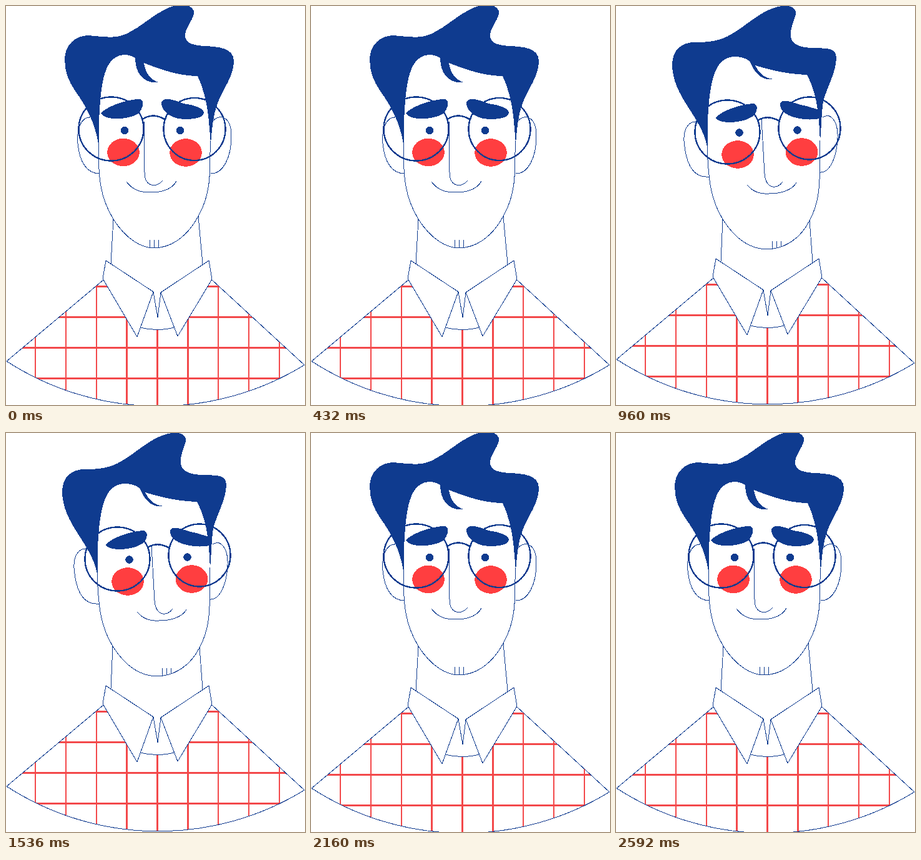
Write an HTML page that moves like this. It is 479 by 638 pixels and loops after 2.88 s.

```html
<!DOCTYPE html>
<html lang="en">
<head>
<meta charset="utf-8">
<title>Man with glasses</title>
<style>
  html, body { margin: 0; width: 100%; height: 100%; overflow: hidden; background: #fff; }
  svg { display: block; width: 100%; height: 100%; shape-rendering: crispEdges; }
  .line { fill: none; stroke: #0f3b8f; stroke-width: 1; }
  .paper { fill: #fff; stroke: #0f3b8f; stroke-width: 1; }
  .frame { fill: none; stroke: #0f3b8f; stroke-width: 2.4; }
  .ink { fill: #0f3b8f; }
  .cheek { fill: #ff3e40; }
  .check { fill: none; stroke: #f3484a; stroke-width: 2.4; }
</style>
</head>
<body>
<svg id="stage" viewBox="0 0 479 638">
  <defs>
    <clipPath id="shirtClip"><path d="M156 438L1 568A448 448 0 0 0 478 574L330 438Z"/></clipPath>
    <g id="shirt">
      <path class="check" clip-path="url(#shirtClip)" id="checks"/>
      <path class="line" d="M156 438L1 568A448 448 0 0 0 478 574L330 438"/>
    </g>
    <path id="collar" class="paper" d="M160 407L236 457L210 529L155 436ZM325 407L248 458L275 528L330 437ZM236 457L243 498L248 458"/>
  </defs>
</svg>
<script>
const stage = document.getElementById('stage');

let checks = '';
for (let i = 0; i < 9; i++) checks += `M${47.1 + i * 48.85} 430V640`;
for (let i = 0; i < 4; i++) checks += `M0 ${448.3 + i * 49}H479`;
document.getElementById('checks').setAttribute('d', checks);

const path = (kind, d) => `<path class="${kind}" d="${d}"/>`;
const ellipse = (kind, [x, y], rx, ry) =>
  `<ellipse class="${kind}" cx="${x}" cy="${y}" rx="${rx}" ry="${ry}"/>`;
const openEye = point => ellipse('ink', point, 6.3, 6.3);
const halfEye = ([x, y]) => path('ink', `M${x - 8} ${y}C${x - 5} ${y - 8} ${x + 5} ${y - 8} ${x + 8} ${y}Q${x} ${y + 3} ${x - 8} ${y}Z`);

// Paired points are listed left, then right.
const poses = {
  left: {
    dy: 0, eye: openEye,
    neck: ['172 341', '308 336'],
    jaw: 'M148 165V220C148 275 150 304 172 341C194 375 218 387 238 387C268 386 293 365 308 336C329 300 327 265 327 215',
    ears: 'M137 178C121 176 113 195 115 220C118 252 131 268 150 268M331 184C346 170 361 180 361 208C361 242 348 269 327 268',
    hair: 'M148 220C142 186 129 161 111 136C100 120 94 105 94 85C94 62 112 47 132 47C152 48 172 54 194 44C222 31 245 3 277 -2C290 -4 303 3 301 13C298 25 285 38 287 49C289 61 303 63 318 64C340 65 365 67 365 88C365 112 348 132 339 155C332 174 330 195 328 220C325 190 325 150 307 112C280 112 250 103 221 91C223 107 232 119 245 122C225 125 207 112 207 83C200 79 195 78 188 78C155 82 150 125 148 220Z',
    brows: 'M152 171C164 159 196 149 214 149C223 150 220 166 210 173C195 182 158 184 152 171ZM249 153C254 145 269 150 284 156C300 158 317 163 317 171C316 179 300 181 285 181C263 180 248 168 249 153Z',
    eyes: [[190, 199], [279, 199]],
    cheeks: [[188, 234], [288, 234.5]],
    lenses: [[168.5, 196.5], [302, 197]],
    bridge: 'M219 181Q235 170 254 181',
    nose: 'M221 183L222 266C222 290 242 291 251 279',
    mouth: 'M193 281C203 294 214 298 232 298C255 298 268 290 273 280',
    chin: 'M230 386L231 374M237 387V374M244 386L245 374'
  },
  middle: {
    dy: -2, eye: halfEye,
    neck: ['172 338', '310 335'],
    jaw: 'M147 165V220C148 262 154 303 172 338C192 370 216 385 240 385C270 384 295 365 310 335C325 302 324 262 327 215',
    ears: 'M130 179C116 179 111 196 112 214C115 248 128 266 150 268M330 176C346 169 358 184 357 208C355 242 343 265 327 264',
    hair: 'M147 220C138 172 95 141 95 90C95 66 112 50 134 51C155 52 172 51 190 40C215 24 240 3 271 0C283 -2 294 4 292 13C289 27 281 38 283 49C286 62 300 65 315 65C335 65 357 64 357 83C357 108 342 132 335 155C329 175 328 195 327 217C325 185 323 145 305 109C275 110 245 101 219 90C222 104 233 116 247 118C227 121 215 107 211 86C203 80 196 77 188 77C155 78 147 125 147 220Z',
    brows: 'M155 179C168 165 198 155 216 155C225 156 223 170 214 177C200 186 164 190 155 179ZM256 159C260 149 276 157 291 162C306 164 320 168 322 175C316 183 302 184 287 184C268 183 254 172 256 159Z',
    eyes: [[193.5, 200], [285, 198]],
    cheeks: [[192, 234.5], [292, 232]],
    lenses: [[173.5, 198.5], [305.5, 196]],
    bridge: 'M223 183Q240 172 258 184',
    nose: 'M228 183L230 262C231 290 248 291 259 277',
    mouth: 'M201 281C212 293 222 298 240 298C265 298 276 289 280 279',
    chin: 'M239 384L240 373M247 385V372M255 383L254 374'
  },
  right: {
    dy: -3, eye: openEye,
    neck: ['171 341', '310 343'],
    jaw: 'M146 165V225C148 280 152 310 171 341C193 376 218 389 243 389C272 388 297 370 310 343C330 308 326 268 327 215',
    ears: 'M131 185C114 183 108 200 109 216C112 254 124 275 149 273M331 178C346 169 356 188 355 210C354 245 341 267 327 266',
    hair: 'M146 225C136 174 90 146 90 92C91 70 105 58 126 58C150 58 167 56 185 45C210 31 235 4 266 0C278 -2 290 3 288 13C285 25 278 38 280 50C283 63 298 66 312 67C335 68 353 65 353 83C352 108 338 130 332 152C329 172 329 195 327 217C325 185 325 145 306 110C275 109 250 103 223 95C228 107 238 116 252 117C233 120 222 107 214 88C207 83 198 81 190 81C155 82 147 125 146 225Z',
    brows: 'M159 179C171 166 202 157 220 156C229 157 227 171 218 177C204 187 168 190 159 179ZM263 156C267 147 281 154 296 158C308 160 320 165 328 167L326 180C316 182 305 182 295 180C275 177 262 168 263 156Z',
    eyes: [[197.5, 202.5], [290.5, 198.5]],
    cheeks: [[195, 237.5], [297.5, 233.5]],
    lenses: [[178.5, 201.5], [310, 195.5]],
    bridge: 'M227 183Q243 173 262 184',
    nose: 'M233 180L238 268C240 293 258 294 267 281',
    mouth: 'M210 286C220 298 232 301 245 300C270 300 285 291 289 282',
    chin: 'M250 388V376M257 387V376M265 385L264 376'
  }
};

function drawPose(name, p) {
  const shift = `transform="translate(0 ${p.dy})"`;
  const neckBase = 412 + p.dy, hem = 514 + p.dy;
  return `<g id="${name}">
    <use href="#shirt" ${shift}/>
    ${path('paper', `M${p.neck[0]}L168 ${neckBase}L215 ${hem}Q242 ${hem + 7} 270 ${hem}L315 ${neckBase}L${p.neck[1]}`)}
    <use href="#collar" ${shift}/>
    ${path('paper', p.jaw)}
    ${p.cheeks.map(c => ellipse('cheek', c, 25.8, 22.3)).join('')}
    ${path('line', p.ears + p.nose + p.mouth + p.chin)}
    ${path('ink', p.hair + p.brows)}
    ${p.eyes.map(p.eye).join('')}
    ${ellipse('frame', p.lenses[0], 52, 51)}
    ${ellipse('frame', p.lenses[1], 49.5, 50)}
    ${path('frame', p.bridge)}
  </g>`;
}

stage.insertAdjacentHTML('beforeend',
  Object.entries(poses).map(([name, pose]) => drawPose(name, pose)).join(''));
const groups = Object.keys(poses).map(name => document.getElementById(name));

function poseAt(t) {
  if (t < 720 || t >= 2160) return 'left';
  return t >= 960 && t < 1920 ? 'right' : 'middle';
}

const start = performance.now();
function render(now) {
  const current = poseAt(Math.max(0, now - start) % 2880);
  for (const g of groups) g.style.display = g.id === current ? '' : 'none';
  requestAnimationFrame(render);
}
render(start);
</script>
</body>
</html>
```
